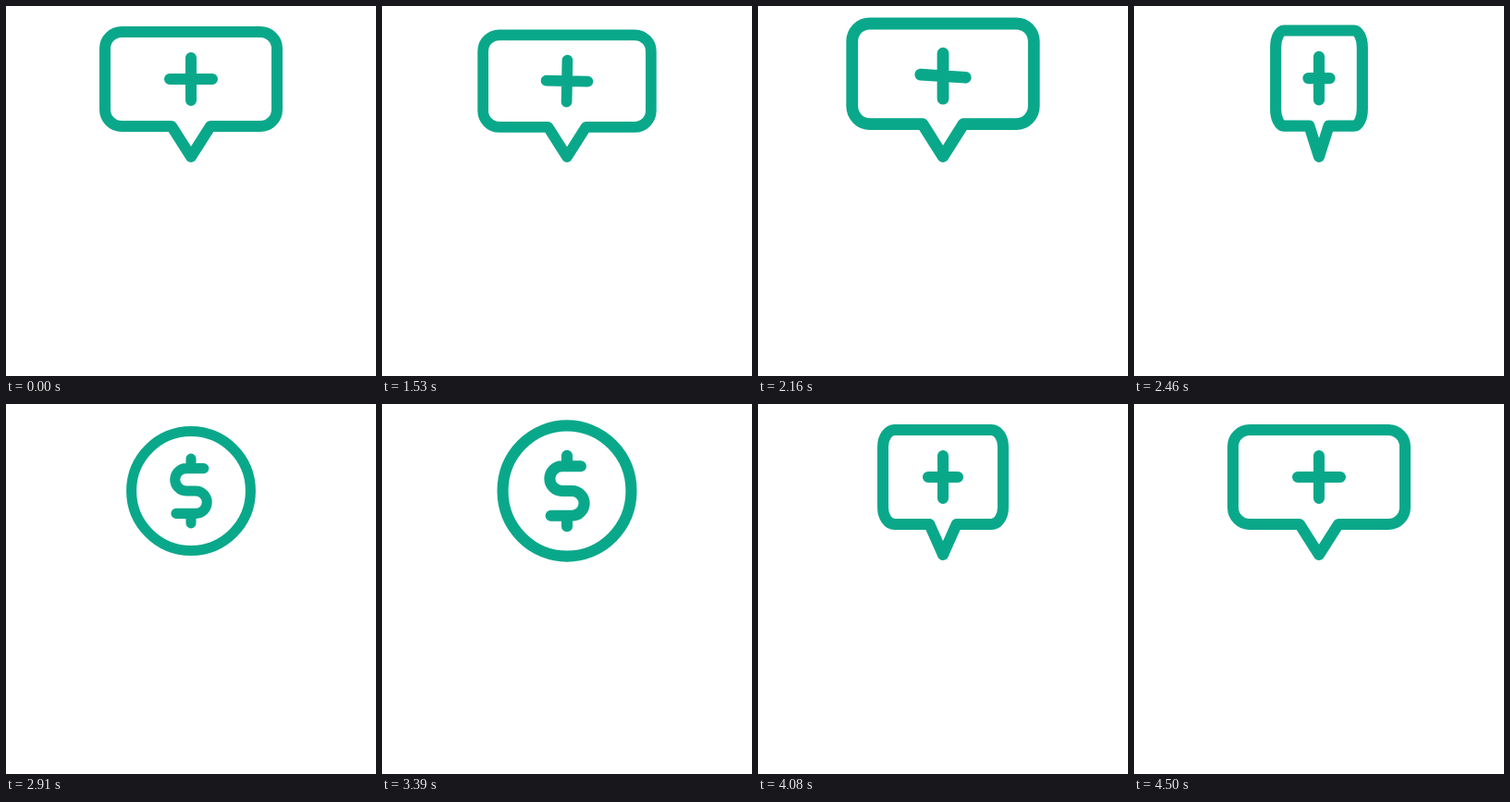
Animation, 400 px wide and 400 px high, one loop 4530 ms. Source, as an HTML page with a canvas:

```html
<!DOCTYPE html>
<html>
<head>
<meta charset="utf-8">
<style>
html, body { margin: 0; width: 100%; height: 100%; overflow: hidden; background: #fff; }
canvas { display: block; }
</style>
</head>
<body>
<canvas id="stage" width="400" height="400"></canvas>
<script>
const ctx = document.getElementById('stage').getContext('2d');
const LOOP = 4530, STEP = 30, COLOR = '#0aa88a', LINE = 12;

const smooth = p => (1 - Math.cos(Math.PI * p)) / 2;
const easeIn = p => p * p;
const easeOut = p => 1 - (1 - p) ** 2;
const softOut = p => 1 - (1 - p) ** 2.4;

// Eased progress of t from start to end, clamped to 0..1
const progress = (t, start, end, ease = smooth) =>
  ease(Math.min(1, Math.max(0, (t - start) / (end - start))));

// Path coordinates are flipped and scaled around the pivot; the line only scales
function outline(pivotY, flip, size, build) {
  const matrix = new DOMMatrix()
    .translate(200, pivotY)
    .scale(flip * size, size)
    .translate(-200, -pivotY);
  const path = new Path2D();
  path.addPath(build(), matrix);
  ctx.lineWidth = LINE * size;
  ctx.stroke(path);
}

function bar(path, y, degrees) {
  const a = degrees * Math.PI / 180;
  const dx = 23 * Math.cos(a), dy = 23 * Math.sin(a);
  path.moveTo(200 - dx, y - dy);
  path.lineTo(200 + dx, y + dy);
}

function drawBubble(t) {
  const size = 1
    - 0.1 * progress(t, 1500, 1740, easeOut)
    + 0.17 * progress(t, 1740, 2055)
    - 0.07 * progress(t, 2055, 2600);
  const flip = t < 2600
    ? 1 - progress(t, 2120, 2600, easeIn)
    : progress(t, 3808, 4500, softOut);
  const drop = 2.3 * (progress(t, 1740, 2100) - progress(t, 2160, 2500));
  const spin = progress(t, 1500, 2100);
  const settle = progress(t, 2100, 2400);

  outline(169, flip, size, () => {
    const path = new Path2D(
      'M179 130H125a18 18 0 0 1-18-18V46a18 18 0 0 1 18-18H275' +
      'a18 18 0 0 1 18 18V112a18 18 0 0 1-18 18H221L200 163Z');
    bar(path, 79 + drop, 184 * spin - 4 * settle);
    bar(path, 79 + drop, 90 + 180 * spin);
    return path;
  });
}

function drawCoin(t) {
  const size = 1
    - 0.08 * progress(t, 2600, 2910)
    + 0.12 * progress(t, 2910, 3135)
    - 0.04 * progress(t, 3135, 3500);
  const flip = progress(t, 2600, 2900, easeOut) - progress(t, 3330, 3808, easeIn);

  outline(94, flip, size, () => new Path2D(
    'M270 94A70 70 0 0 1 130 94A70 70 0 0 1 270 94Z' +
    'M215 67.5H194.5a13.25 13.25 0 0 0 0 26.5H205.5a13.25 13.25 0 0 1 0 26.5H182.5' +
    'M200 56V67.5M200 120.5V132'));
}

function draw(now) {
  const t = Math.floor(now % LOOP / STEP) * STEP;
  ctx.fillStyle = '#fff';
  ctx.fillRect(0, 0, 400, 400);
  ctx.strokeStyle = COLOR;
  ctx.lineCap = ctx.lineJoin = 'round';
  if (t >= 2600 && t < 3808) drawCoin(t);
  else drawBubble(t);
}

const begin = performance.now();
function tick() {
  draw(performance.now() - begin);
  requestAnimationFrame(tick);
}
tick();
</script>
</body>
</html>
```
